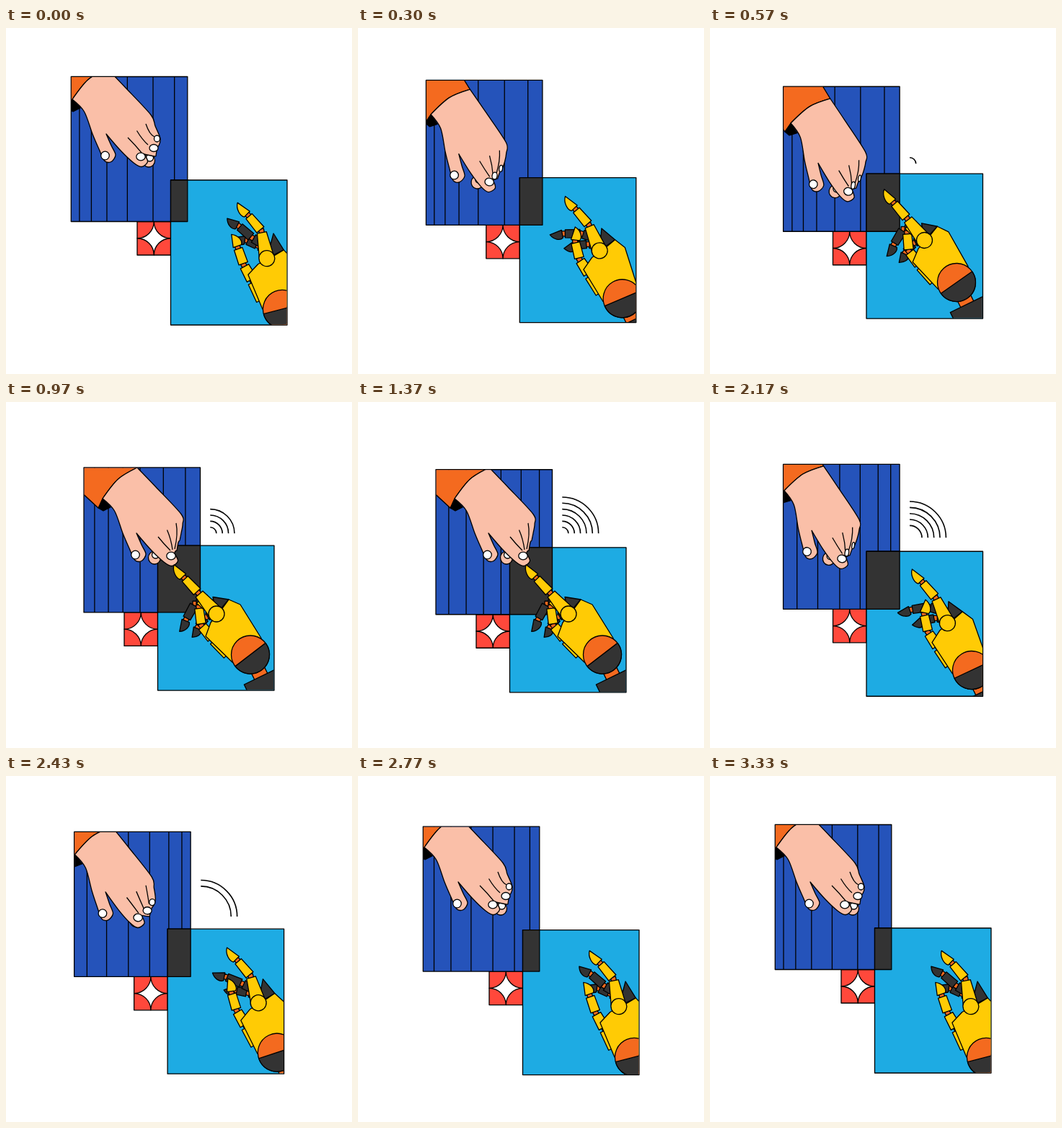
An HTML page with a canvas that plays this animation: 480 px wide and 480 px high, repeating every 3370 ms.

```html
<!DOCTYPE html>
<html lang="en">
<head>
<meta charset="utf-8">
<title>Two hands</title>
<style>
html, body { margin: 0; width: 100%; height: 100%; overflow: hidden; background: #fff; }
canvas { display: block; width: 480px; height: 480px; }
</style>
</head>
<body>
<canvas id="stage" width="480" height="480"></canvas>
<script>
const ctx = document.getElementById('stage').getContext('2d');
const LOOP = 3370, W = 161.5, H = 201, TURN = 2 * Math.PI;
const BLUE = '#2553ba', CYAN = '#1eabe3', DARK = '#333333', RED = '#ff483b',
  ORANGE = '#f46a1f', YELLOW = '#ffcb05', SKIN = '#fabfa8', INK = '#000';

// Human wrist x, y, turn, curl; robot ball x, y, turn, spread
const open = [92, 99, 0, 0, 383, 390, 23, 1];
const half = [103, 123, 9.8, .85, 363, 372, 12.5, .5];
const near = [112, 132, 10, .85, 342, 353, 2.5, 0];
const touch = [134, 134, 0, 1, 339, 350.5, 0, 0];
const KEYS = [[0, open], [350, half], [570, near], [970, touch],
  [1770, touch], [2170, half], [2700, open], [LOOP, open]];

const rad = deg => deg * Math.PI / 180;
const mix = (a, b, u) => a + (b - a) * u;
const smooth = u => { u = Math.min(1, Math.max(0, u)); return u * u * (3 - 2 * u); };

// Monotone cubic through the keys, flat wherever the motion turns
function poseAt(t) {
  const i = KEYS.findIndex(([at], k) => k && t < at) - 1;
  const span = KEYS[i + 1][0] - KEYS[i][0], u = (t - KEYS[i][0]) / span, v = 1 - u;
  return open.map((_, c) => {
    const val = k => KEYS[k][1][c];
    const slope = k => KEYS[k + 1] && k >= 0 ? (val(k + 1) - val(k)) / (KEYS[k + 1][0] - KEYS[k][0]) : 0;
    const tangent = k => {
      const a = slope(k - 1), b = slope(k);
      return a * b <= 0 ? 0 : 2 * a * b / (a + b);
    };
    return val(i) * (1 + 2 * u) * v * v + val(i + 1) * u * u * (3 - 2 * u)
      + span * u * v * (tangent(i) * v - tangent(i + 1) * u);
  });
}

function paint(fill) {
  if (fill) { ctx.fillStyle = fill; ctx.fill(); }
  ctx.stroke();
}

function poly(pts, fill) {
  ctx.beginPath();
  pts.forEach(p => ctx.lineTo(...p));
  ctx.closePath();
  paint(fill);
}

// Closed smooth curve through points; listed corners stay sharp
function blob(pts, fill, corners) {
  const n = pts.length, get = i => pts[(i + n) % n];
  const handle = (i, dir) => {
    const k = corners.includes(i % n) ? 0 : dir / 6.5;
    const p = get(i), a = get(i - 1), b = get(i + 1);
    return [p[0] + (b[0] - a[0]) * k, p[1] + (b[1] - a[1]) * k];
  };
  ctx.beginPath();
  ctx.moveTo(...pts[0]);
  for (let i = 0; i < n; i++)
    ctx.bezierCurveTo(...handle(i, 1), ...handle(i + 1, -1), ...get(i + 1));
  ctx.closePath();
  paint(fill);
}

function box(x, y, w, h, fill) {
  ctx.beginPath();
  ctx.rect(x, y, w, h);
  paint(fill);
}

function oval(x, y, rx, ry, fill) {
  ctx.beginPath();
  ctx.ellipse(x, y, rx, ry, 0, 0, TURN);
  paint(fill);
}

// Draws inside a panel, in a frame moved to (hx, hy) and turned
function inPanel(x, y, hx, hy, turn, draw) {
  ctx.save();
  ctx.beginPath();
  ctx.rect(x + .6, y + .6, W - 1.2, H - 1.2);
  ctx.clip();
  ctx.translate(hx, hy);
  ctx.rotate(rad(turn));
  draw();
  ctx.restore();
}

// Wrist at 0,0; the outer fingers tuck in as the hand curls
function humanHand(curl) {
  const tuck = (x, y, k = 1) => [x - 13 * curl * k, y - 6 * curl * k];
  const top = [48, -43], mid = [21.5, -27], wrist = [0, 0], low = [-6, 13];
  const skin = [
    top, [74, -16], [109, 21.5],
    tuck(115, 37, .3), tuck(122, 54), tuck(120, 64), tuck(118, 67), tuck(116, 78), tuck(114, 79),
    [99.5, 76], [104.5, 86.5], [96, 93.5], [85, 88], [67, 71],
    [47, 48], [54, 64], [60, 77], [54, 86.5], [45, 85.5], [37, 69], [28, 48], [16.5, 17],
    wrist, mid
  ];
  poly([wrist, [11, 12], [1, 17], low], INK);
  blob([top, mid, wrist, low, [-46, -24], [13, -83]], ORANGE, [0, 2, 3, 4, 5]);

  const mx = mix(106, 72, curl), my = mix(85, 82, curl);
  oval(mx, my, 8.5, 9, SKIN);
  oval(mx + 1.5, my - 4, 5, 5, '#fff');
  blob(skin, SKIN, [0, 5, 7, 9, 14, 22]);

  for (let i = 0; i < 3; i++) {
    ctx.beginPath();
    ctx.moveTo(77 + 12.5 * i, 53 - 9.5 * i);
    ctx.quadraticCurveTo(mix(87, 85, curl) + 10 * i, 63 - 7 * i,
      mix(96 + 9 * i, 94 + 3 * i, curl), mix(74 - 11 * i, 72 - i, curl));
    ctx.stroke();
  }
  const show = Math.min(1, 3 * (1 - curl));
  if (show > .02) {
    oval(117.5 - 12 * curl, 54.5 + 5 * curl, 4 * show, 4.5, '#fff');
    oval(113 - 15 * curl, 67.5 + 3 * curl, 6 * show, 5, '#fff');
  }
  oval(95, 79.5, 6.2, 5.3, '#fff');
  oval(45.5, 78, 5.8, 5.8, '#fff');
}

// Tapered segment covering distances from..to along the line a-b
function bone(a, dir, from, to, wa, wb, fill) {
  const c = Math.cos(dir), s = Math.sin(dir);
  const spot = (along, side) => [a[0] + c * along - s * side, a[1] + s * along + c * side];
  poly([spot(from, wa / 2), spot(to, wb / 2), spot(to, -wb / 2), spot(from, -wa / 2)], fill);
}

function fingertip(j, dir, len, width, side, fill) {
  const c = Math.cos(dir), s = Math.sin(dir), r = width / 2;
  const spot = (along, out) => [j[0] + c * along + s * side * out, j[1] + s * along - c * side * out];
  ctx.beginPath();
  ctx.moveTo(...spot(2, -r));
  ctx.lineTo(...spot(len, -r * .4));
  ctx.bezierCurveTo(...spot(len - 4, r), ...spot(7, r * 1.6), ...spot(2, r));
  ctx.closePath();
  paint(fill);
}

// Chain of segments: folded angles plus a bend that grows with the spread
function finger(start, lengths, folded, bend, spread, widths, side, fill) {
  const last = lengths.length - 1;
  let p = start;
  const links = lengths.map((len, i) => {
    const link = { p, len, dir: rad(folded[i] + bend[i] * spread) };
    p = [p[0] + len * Math.cos(link.dir), p[1] + len * Math.sin(link.dir)];
    return link;
  });
  links.slice(0, last).forEach(({ p, dir, len }, i) => {
    bone(p, dir, len - 5, len + 3, 7, 7, ORANGE);
    bone(p, dir, i ? 2.5 : 0, len - 2, widths[i], widths[i + 1], fill);
  });
  const tip = links[last];
  fingertip(tip.p, tip.dir, tip.len, widths[last], side, fill);
}

// Ball joint at 0,0
function robotHand(spread, turn) {
  const knuckle = [-47, -56.5], corner = [-30, -76.5];
  finger([-37, -66], [28, 18, 16], [150, 130, 112], [34, 52, 52], spread, [13, 11, 11], 1, DARK);
  finger([-37, -70], [40, 25, 19], [181, 119, 112], [6, 79, 72], spread, [12, 12, 11], 1, DARK);
  poly([corner, [-52, -80 - 12 * spread], knuckle], DARK);
  finger([-31, -1], [29, 25, 26, 20], [-135, -131, -98, -48], [-4, -11, -34, -84], spread,
    [16, 15, 13, 12], -1, YELLOW);
  poly([[-38, -65.5], corner, [-14, -69.5], [15, -23], [1, 1], [-25, 10.5], [-62, -25.5], [-55, -44.5]], YELLOW);
  finger(knuckle, [38.5, 29, 22.5], [-131, -133, -133], [7, -20, -26], spread, [21, 13, 11], 1, YELLOW);
  oval(...knuckle, 11, 11, YELLOW);

  ctx.save();
  ctx.rotate(rad(-26 - turn));
  box(-10, 20, 20, 15, ORANGE);
  box(-26, 33.5, 90, 60, DARK);
  ctx.restore();

  oval(0, 0, 26.5, 26.5, ORANGE);
  ctx.beginPath();
  ctx.arc(0, 0, 26.5, rad(-37.5), rad(142.5));
  ctx.closePath();
  paint(DARK);
}

function star(x, y, size) {
  const r = size / 2;
  box(x, y, size, size, RED);
  ctx.beginPath();
  ctx.arc(x + size, y, r, Math.PI, Math.PI / 2, true);
  ctx.arc(x + size, y + size, r, -Math.PI / 2, Math.PI, true);
  ctx.arc(x, y + size, r, 0, -Math.PI / 2, true);
  ctx.arc(x, y, r, Math.PI / 2, 0, true);
  ctx.closePath();
  paint('#fff');
}

// Six lines swaying one after another, widest in the middle of the panel
function stripes(x, y, t) {
  [15.5, 37.5, 62, 89, 119.5, 144.8].forEach((mean, i) => {
    const sway = 18 * Math.sin(Math.PI * mean / W) ** 1.2;
    const sx = x + mean - sway * Math.cos(TURN * t / LOOP - rad(22 + 10 * i));
    ctx.beginPath();
    ctx.moveTo(sx, y);
    ctx.lineTo(sx, y + H);
    ctx.stroke();
  });
}

function signal(x, y, t) {
  ctx.lineWidth = 1.6;
  for (let i = 0; i < 6; i++) {
    if (t < 540 + i * 125 || t >= 2150 + i * 90) continue;
    ctx.beginPath();
    ctx.arc(x, y, 8.6 + i * 8.35, -Math.PI / 2, 0);
    ctx.stroke();
  }
  ctx.lineWidth = 1.3;
}

function draw(t) {
  const slide = t < LOOP / 2 ? smooth(t / 960) : 1 - smooth((t - 1780) / 960);
  const bob = 4.65 * (1 - Math.cos(TURN * t / LOOP));
  const bx = 90.3 + 17.7 * slide, by = 67.5 + 17.7 * slide + bob;
  const cx = 228.5 - 18 * slide, cy = 211 - 17.7 * slide + bob;
  const [hx, hy, hTurn, curl, rx, ry, rTurn, spread] = poseAt(t);

  ctx.fillStyle = '#fff';
  ctx.fillRect(0, 0, 480, 480);
  ctx.strokeStyle = INK;
  ctx.lineWidth = 1.3;
  ctx.lineJoin = 'round';

  star(cx - 46.5, by + H, 46.5);
  box(bx, by, W, H, BLUE);
  stripes(bx, by, t);
  box(cx, cy, W, H, CYAN);
  box(cx, cy, bx + W - cx, by + H - cy, DARK);
  signal(266.1 + 17.2 * slide, 199 - 16.7 * slide, t);

  inPanel(bx, by, hx, hy, hTurn, () => humanHand(curl));
  inPanel(cx, cy, rx, ry, rTurn, () => robotHand(spread, rTurn));
}

const start = performance.now();
function tick() {
  draw((performance.now() - start) % LOOP);
  requestAnimationFrame(tick);
}
tick();
</script>
</body>
</html>
```
